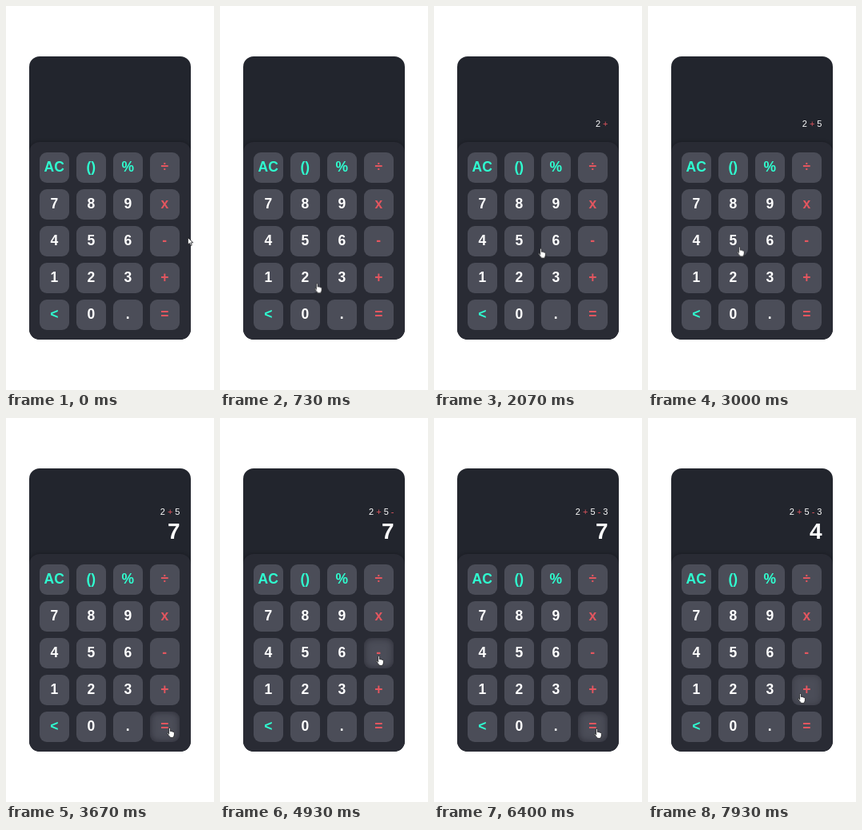
Animation of 260x480 px, one loop 8000 ms. Source, as an HTML page:

```html
<!DOCTYPE html>
<html lang="en">
<head>
<meta charset="utf-8">
<title>Calculator</title>
<style>
  html, body { margin: 0; width: 100%; height: 100%; overflow: hidden; background: #fff; }
  body { position: relative; font-family: "Liberation Sans", Arial, sans-serif; color: #fff; }

  .calc {
    position: absolute; left: 29px; top: 63px; width: 201.5px; height: 354px;
    border-radius: 13px; background: #22252d; overflow: hidden;
  }
  .pad {
    position: absolute; left: 0; top: 107px; width: 100%; height: 247px;
    border-radius: 13px; background: #292b34; box-shadow: 0 0 5px rgba(0, 0, 0, .32);
  }
  .keys {
    position: absolute; left: 12.5px; top: 13px;
    display: grid; grid-template-columns: repeat(4, 37.5px); grid-auto-rows: 37.5px; gap: 8.5px;
  }
  .key {
    position: relative; border-radius: 9px; background: #4b4d58;
    font: bold 17.5px/37.5px "Liberation Sans", Arial, sans-serif; text-align: center;
  }
  .green { color: #2fffd0; }
  .red, i { color: #e2565f; font-style: normal; }

  .key::after {
    content: ""; position: absolute; inset: 0; border-radius: inherit; opacity: 0;
    box-shadow: inset 0 0 8px rgba(24, 25, 32, .62);
  }
  .plus::after { animation: hover-plus 8s linear infinite; }
  .minus::after { animation: hover-minus 8s linear infinite; }
  .equals::after { animation: hover-equals 8s linear infinite; }
  @keyframes hover-plus {
    0%, 20% { opacity: 0; } 22%, 23.7% { opacity: 1; }
    25%, 98.4% { opacity: 0; } 99.1%, 100% { opacity: .6; }
  }
  @keyframes hover-minus {
    0%, 57% { opacity: 0; } 59%, 62.4% { opacity: 1; } 64%, 100% { opacity: 0; }
  }
  @keyframes hover-equals {
    0%, 43% { opacity: 0; } 45%, 51% { opacity: 1; } 53%, 77% { opacity: 0; }
    79%, 98.3% { opacity: 1; } 99%, 100% { opacity: 0; }
  }

  /* Display */
  .expr { animation: lift 8s step-end infinite; }
  .expr b, .result {
    position: absolute; right: 13px; opacity: 0; white-space: nowrap;
    animation: 8s step-end infinite;
  }
  .expr b { top: 78px; font: 11px/12px "Liberation Sans", Arial, sans-serif; }
  .result { top: 63px; font: bold 28px/32px "Liberation Sans", Arial, sans-serif; }
  @keyframes lift { 0% { transform: none; } 45% { transform: translateY(-30px); } }
  @keyframes first { 0% { opacity: 0; } 12.5% { opacity: 1; } 23.3% { opacity: 0; } }
  @keyframes second { 0% { opacity: 0; } 23.3% { opacity: 1; } 35.8% { opacity: 0; } }
  @keyframes third { 0% { opacity: 0; } 35.8% { opacity: 1; } 61.6% { opacity: 0; } }
  @keyframes fourth { 0% { opacity: 0; } 61.6% { opacity: 1; } 70% { opacity: 0; } }
  @keyframes fifth { 0% { opacity: 0; } 70% { opacity: 1; } }
  @keyframes sum { 0% { opacity: 0; } 45% { opacity: 1; } 85.8% { opacity: 0; } }
  @keyframes difference { 0% { opacity: 0; } 85.8% { opacity: 1; } }

  /* Pointer */
  .pointer { position: absolute; left: 0; top: 0; animation: travel 8s linear infinite; }
  .pointer svg { position: absolute; left: 0; top: 0; overflow: visible; }
  .pointer path { fill: #fff; stroke: #17181c; stroke-width: .8; stroke-linejoin: round; }
  .arrow { animation: arrow 8s step-end infinite; }
  .hand { animation: hand 8s step-end infinite; }
  @keyframes arrow { 0% { opacity: 1; } 6.6% { opacity: 0; } }
  @keyframes hand { 0% { opacity: 0; } 6.6% { opacity: 1; } }
  @keyframes travel {
    0%, .86% { transform: translate(227px, 289px); }
    .87%, 5.4% { transform: translate(226px, 289px); animation-timing-function: ease-in-out; }
    9.1% { transform: translate(118px, 346px); animation-timing-function: ease-out; }
    10.8%, 14% { transform: translate(112px, 355px); }
    15.9% { transform: translate(129px, 348px); animation-timing-function: ease-out; }
    20.9%, 23.2% { transform: translate(200px, 336px); animation-timing-function: ease-in; }
    25.8% { transform: translate(131px, 303px); animation-timing-function: ease-out; }
    30%, 33.3% { transform: translate(104px, 293px); }
    33.4%, 35.8% { transform: translate(104px, 294px); animation-timing-function: ease-in-out; }
    45%, 50.6% { transform: translate(201px, 387px); animation-timing-function: ease-in-out; }
    60%, 62.1% { transform: translate(195px, 297px); animation-timing-function: ease-in-out; }
    67.5%, 70.4% { transform: translate(150px, 341px); animation-timing-function: ease-in-out; }
    79.9%, 88.3% { transform: translate(200px, 388px); }
    88.4%, 97.6% { transform: translate(199px, 387px); }
    99.1%, 100% { transform: translate(187px, 344px); }
  }
</style>
</head>
<body>
  <div class="calc">
    <div class="pad">
      <div class="keys">
        <div class="key green">AC</div><div class="key green">()</div><div class="key green">%</div><div class="key red">÷</div>
        <div class="key">7</div><div class="key">8</div><div class="key">9</div><div class="key red">x</div>
        <div class="key">4</div><div class="key">5</div><div class="key">6</div><div class="key red minus">-</div>
        <div class="key">1</div><div class="key">2</div><div class="key">3</div><div class="key red plus">+</div>
        <div class="key green">&lt;</div><div class="key">0</div><div class="key">.</div><div class="key red equals">=</div>
      </div>
    </div>
    <div class="expr">
      <b style="animation-name: first">2</b>
      <b style="animation-name: second">2 <i>+</i></b>
      <b style="animation-name: third">2 <i>+</i> 5</b>
      <b style="animation-name: fourth">2 <i>+</i> 5 <i>-</i></b>
      <b style="animation-name: fifth">2 <i>+</i> 5 <i>-</i> 3</b>
    </div>
    <div class="result" style="animation-name: sum">7</div>
    <div class="result" style="animation-name: difference">4</div>
  </div>
  <div class="pointer">
    <svg class="arrow" width="8" height="12"><path d="M.4 .4V9.2L2.4 7.4L3.8 10.6L5.3 10L3.9 6.9H6.8Z"/></svg>
    <svg class="hand" width="10" height="13"><path d="M2.6 8.2V1.4Q2.6 .4 3.5 .4T4.4 1.4V4.6Q5.2 4 6 4.8Q6.8 4.4 7.5 5.2Q9.4 4.9 9.4 6.6V9Q9.2 10.4 8.4 11.2V12.4H3.8V11.4Q2 9.6 .6 7.4Q.2 6.4 1.2 6.3Q2 6.6 2.6 8.2Z"/></svg>
  </div>
</body>
</html>
```
